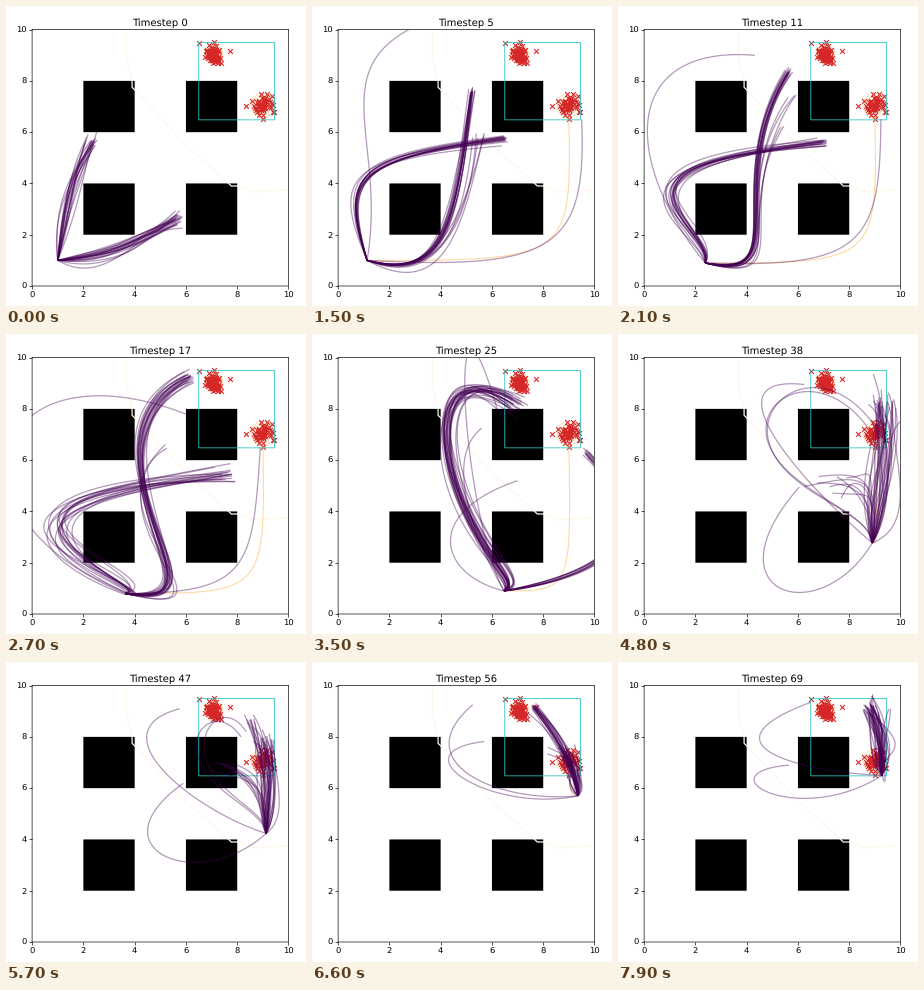
A matplotlib script for the animation above (8 s loop, 300 by 300 pixels).

```python
from math import comb

import numpy as np
import matplotlib.pyplot as plt
from matplotlib.animation import FuncAnimation
from matplotlib.collections import LineCollection
from matplotlib.patches import Rectangle

PURPLE, ORANGE, RED, CYAN, IVORY = "#440154", "#ffb347", "#d62728", "#2fc4c4", "#fff7ec"
HOLD, LAST = 10, 69     # frames held on the first timestep, final timestep
SAMPLES = 60
S = np.linspace(0, 1, SAMPLES)[:, None]

plt.rcParams.update({"path.snap": False, "text.hinting": "none"})


def bezier(*pts):
    n = len(pts) - 1
    return sum(comb(n, i) * S**i * (1 - S)**(n - i) * np.array(p, float)
               for i, p in enumerate(pts))


def bundle(start, count, spread, *controls):
    """Scattered Bezier routes that share one start."""
    base = np.array(controls, float)
    size = np.full((len(base), 1), 1.5 * spread)
    size[-1] = spread
    return [bezier(start, *(base + size * rng.standard_t(6, base.shape)))
            for _ in range(count)]


def plan(start, *bundles):
    return np.array([line for b in bundles for line in bundle(start, *b)])


rng = np.random.default_rng(12)
times = np.array([0, 5, 17, 25, 38, 56, 69])
plans = [
    plan((1, 1),
         (20, .11, (1.3, 3.2), (1.6, 4.2), (2.35, 5.65)),
         (22, .13, (3.2, 1.2), (4, 1.6), (5.75, 2.6))),
    plan((1.13, 1),
         (17, .07, (.1, 4.2), (.5, 5), (6.5, 5.78)),
         (1, 0, (1.9, 5.5), (-.5, 8.3), (2.85, 10.05)),
         (18, .06, (4.2, .2), (4.5, 2.4), (5.22, 7.6)),
         (5, .12, (4, 0), (4.9, 2.5), (5.6, 5.9)),
         (1, 0, (8.5, .6), (9.7, 1.5), (9.5, 6.5))),
    plan((3.63, .8),
         (17, .24, (5.4, .8), (-4.9, 4.1), (3.2, 5.1), (7.7, 5.3)),
         (1, 0, (-4, 4), (-1.5, 10.7), (6, 7.8)),
         (21, .12, (7.5, .3), (4, 3.2), (2.6, 7.6), (6.2, 9.25)),
         (2, .08, (8, -.3), (4, 2.5), (3, 5), (5.2, 6.5)),
         (1, 0, (8.5, .8), (8.6, 1.8), (8.9, 6.5))),
    plan((6.47, .9),
         (28, .16, (7.65, 1.5), (3.7, 2.6), (2.4, 11.1), (6.9, 8.15)),
         (1, 0, (4, 1.5), (3.2, 3.9), (7, 5.2)),
         (1, 0, (5.5, 2.6), (4, 6), (5.6, 7.25)),
         (1, 0, (4.8, 4), (4.2, 15), (6.2, 8)),
         (11, .1, (9, 1.3), (13.5, 2.5), (9.65, 6.3))),
    plan((8.9, 2.77),
         (1, 0, (6.5, 4.8), (2.2, 9.4), (6.25, 8.95)),
         (1, 0, (6.8, -.7), (2.4, .8), (6.05, 4.95)),
         (2, .1, (8.5, 5), (.6, 4.5), (5.5, 12), (8.8, 7.3)),
         (8, .3, (8.8, 5), (8.4, 5.1), (7.2, 5.1)),
         (30, .26, (9.2, 4.2), (9.6, 6.5), (9.4, 8.3))),
    plan((9.36, 5.7),
         (1, 0, (6.2, 5.4), (2.6, 7), (5.25, 9.25)),
         (1, 0, (6, 5), (2.2, 7.4), (5.7, 7.82)),
         (20, .08, (9.2, 6.8), (8.6, 8), (7.65, 9.15)),
         (20, .2, (9.4, 6.3), (9.2, 6.9), (8.8, 7.4))),
    plan((9.28, 6.5),
         (1, 0, (6.5, 6.6), (1.8, 7.6), (6.5, 9.35)),
         (1, 0, (6, 4.4), (2.2, 6.6), (5.65, 6.9)),
         (40, .2, (9.3, 7.3), (9.25, 8), (8.8, 9.1))),
]
lag = rng.uniform(0, 0.3, len(plans[0]))[:, None, None]


def routes(t):
    """Blend neighbouring plans, each route with its own lag."""
    k = min(np.searchsorted(times, t, side="right") - 1, len(plans) - 2)
    a, b = plans[k], plans[k + 1]
    u = (t - times[k]) / (times[k + 1] - times[k])
    w = np.clip((u - lag * (1 - u)) / (1 - lag * (1 - u)), 0, 1)
    lines = a + (b - a) * w
    start = a[0, 0] + (b[0, 0] - a[0, 0]) * u
    return lines + (start - lines[:, :1]) * (1 - S)**2, start


fig = plt.figure(figsize=(5, 5), dpi=60)
ax = fig.add_axes([26.1 / 300, 20 / 300, 256.4 / 300, 256.4 / 300])
ax.set(xlim=(0, 10), ylim=(0, 10), xticks=range(0, 11, 2), yticks=range(0, 11, 2))
ax.tick_params(pad=3)
title = ax.set_title("Timestep 0", pad=5)

for x in (2, 6):
    for y in (2, 6):
        ax.add_patch(Rectangle((x, y), 2, 2, fc="black", ec="none"))

# goal samples: two clusters with soft density rings and a few stragglers
angle = np.linspace(0, 2 * np.pi, 40)
for cx, cy, sd, count in ((7.08, 9.03, .16, 60), (9, 7.05, .2, 50)):
    for ring, shade in ((1, "#fdbb84"), (1.7, "#fdd49e"), (2.3, "#fee8c8")):
        ax.plot(cx + ring * sd * np.cos(angle), cy + ring * sd * np.sin(angle),
                color=shade, lw=1.5, zorder=1.3)
    pts = (cx, cy) + np.clip(rng.normal(0, sd, (count, 2)), -2.2 * sd, 2.2 * sd)
    ax.scatter(*pts.T, marker="x", s=34, c=RED, lw=1.3, zorder=1.5)
stray = [(6.5, 9.46), (7.1, 9.5), (7.7, 9.16), (8.36, 7.02), (9, 6.5), (9.44, 6.8)]
ax.scatter(*np.transpose(stray), marker="x", s=34, c=RED, lw=1.3, zorder=1.5)
ax.add_patch(Rectangle((6.5, 6.48), 2.95, 3.02, fill=False, ec=CYAN, lw=1, zorder=1.9))

edge = [(3.68, 10), (3.68, 8.8), (3.9, 8), (3.9, 7.75), (4.1, 7.55), (6, 5.5),
        (7.6, 4.06), (7.77, 3.9), (8.05, 3.9), (8.6, 3.68), (10, 3.75)]
ax.plot(*np.transpose(edge), color=IVORY, lw=1.5, zorder=1.8)

best, = ax.plot([], [], color=ORANGE, lw=1.3, alpha=.5, zorder=2)
fan = LineCollection([], colors=PURPLE, linewidths=1.5, alpha=.4, zorder=2.2)
ax.add_collection(fan, autolim=False)


def draw(frame):
    t = min(max(frame - HOLD, 0), LAST)
    lines, start = routes(t)
    corner = (9.1, start[1])
    fan.set_segments(list(lines))
    best.set_data(*bezier(start, corner, corner, (9, 6.6)).T)
    best.set_visible(t > 0)
    title.set_text(f"Timestep {t}")
    return fan, best, title


anim = FuncAnimation(fig, draw, frames=HOLD + LAST + 1, interval=100,
                     repeat=True, repeat_delay=0, blit=False)
plt.show()
```
